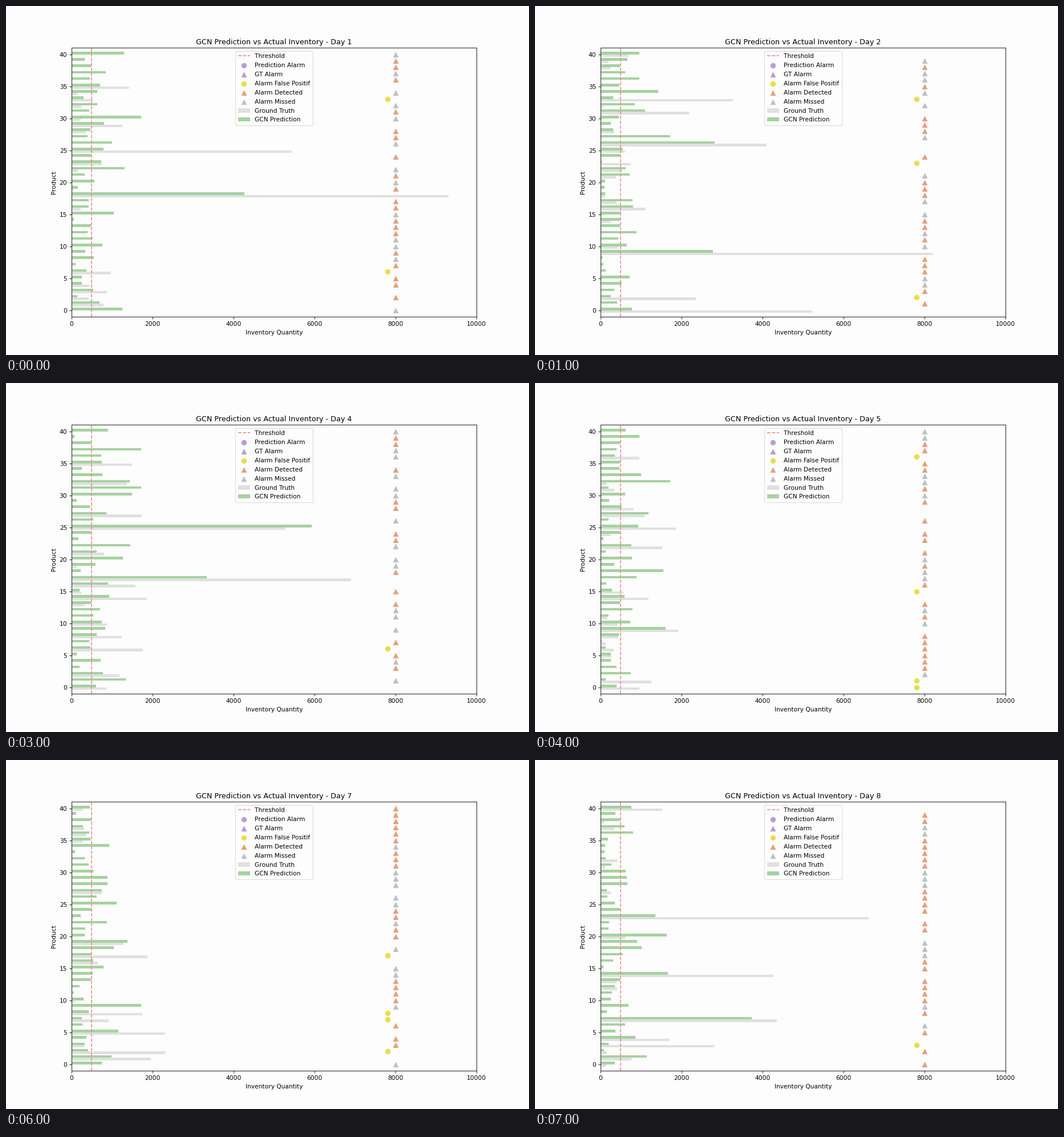
Animation of 917 by 611 pixels, one loop 8000 ms. Source, as a matplotlib script:

```python
import matplotlib.pyplot as plt
import numpy as np
from matplotlib.animation import FuncAnimation

W, H, DPI = 917, 611, 76.4
PAPER = "#fdfdfd"
PRODUCTS = np.arange(41)
DAYS = 8
LIMIT = 500

# The longest bars of a day: product -> (prediction, truth)
PEAKS = {
    1: {18: (4270, 9300), 25: (790, 5430)},
    2: {0: (775, 5220), 9: (2775, 8215), 26: (2815, 4095)},
    3: {1: (3870, 4960), 9: (5010, 5185), 25: (2210, 12000)},
    4: {17: (3335, 6900), 25: (5935, 5285)},
    6: {8: (3920, 5090), 16: (4270, 8880), 23: (3945, 4250)},
    8: {7: (3735, 4360), 14: (1665, 4265), 23: (1355, 6620)},
}
DETECTED, MISSED, FALSE, STOCKED = range(4)
STEADY = [13, 24, 38]


def stock(day):
    """Predicted and true quantity of every product on one day."""
    rng = np.random.default_rng(day)
    n = len(PRODUCTS)
    kind = rng.choice(4, n, p=[0.43, 0.33, 0.09, 0.15])
    kind[STEADY] = DETECTED

    low = rng.uniform(30, 490, n)
    low[STEADY] = 480
    high = 515 + np.minimum(rng.exponential(330, n), 1200)
    faint = np.where(rng.random(n) < 0.3, rng.uniform(60, 450, n), 0)
    full = 520 + np.minimum(rng.exponential(900, n), 3500)

    enough = np.isin(kind, [FALSE, STOCKED])
    truth = np.where(enough, full, faint)
    pred = np.where(np.isin(kind, [DETECTED, FALSE]), low,
                    np.maximum(high, truth / 2))
    for row, (p, t) in PEAKS.get(day, {}).items():
        pred[row], truth[row] = p, t
    return pred, truth


fig, ax = plt.subplots(figsize=((W + 0.01) / DPI, (H + 0.01) / DPI), dpi=DPI,
                       facecolor=PAPER)
ax.set_facecolor(PAPER)
ax.axvline(LIMIT, color="#ea8c86", ls="--", label="Threshold")


def markers(shape, color, label):
    return ax.scatter([], [], s=60, marker=shape, color=color, label=label)


markers("o", "#ba9bd2", "Prediction Alarm")
markers("^", "#ba9bd2", "GT Alarm")
false_dots = markers("o", "#e9de48", "Alarm False Positif")
hit_dots = markers("^", "#e6a07c", "Alarm Detected")
miss_dots = markers("^", "#bcc1c8", "Alarm Missed")

zeros = np.zeros(len(PRODUCTS))
truth_bars = ax.barh(PRODUCTS - 0.2, zeros, 0.4, color="#e0e0e0",
                     label="Ground Truth")
pred_bars = ax.barh(PRODUCTS + 0.2, zeros, 0.4, color="#a6d2a0",
                    label="GCN Prediction")

ax.set(xlim=(0, 10000), ylim=(-1, 41))
ax.tick_params(axis="x", pad=4.3)
ax.set_xlabel("Inventory Quantity", labelpad=4.5)
ax.set_ylabel("Product")
title = ax.set_title("")
ax.legend(loc="upper center", labelspacing=0.56, facecolor=PAPER,
          edgecolor="#d3d4c4")


def place(dots, x, mask):
    rows = PRODUCTS[mask]
    dots.set_offsets(np.column_stack([np.full(len(rows), x), rows]))


def update(i):
    day = i + 1
    pred, truth = stock(day)
    for bars, values in ((pred_bars, pred), (truth_bars, truth)):
        for bar, value in zip(bars, values):
            bar.set_width(value)
    warned, short = pred < LIMIT, truth < LIMIT
    place(false_dots, 7800, warned & ~short)
    place(hit_dots, 8000, warned & short)
    place(miss_dots, 8000, ~warned & short)
    title.set_text(f"GCN Prediction vs Actual Inventory - Day {day}")


anim = FuncAnimation(fig, update, frames=DAYS, init_func=lambda: update(0),
                     interval=1000, repeat=True)
plt.show()
```
